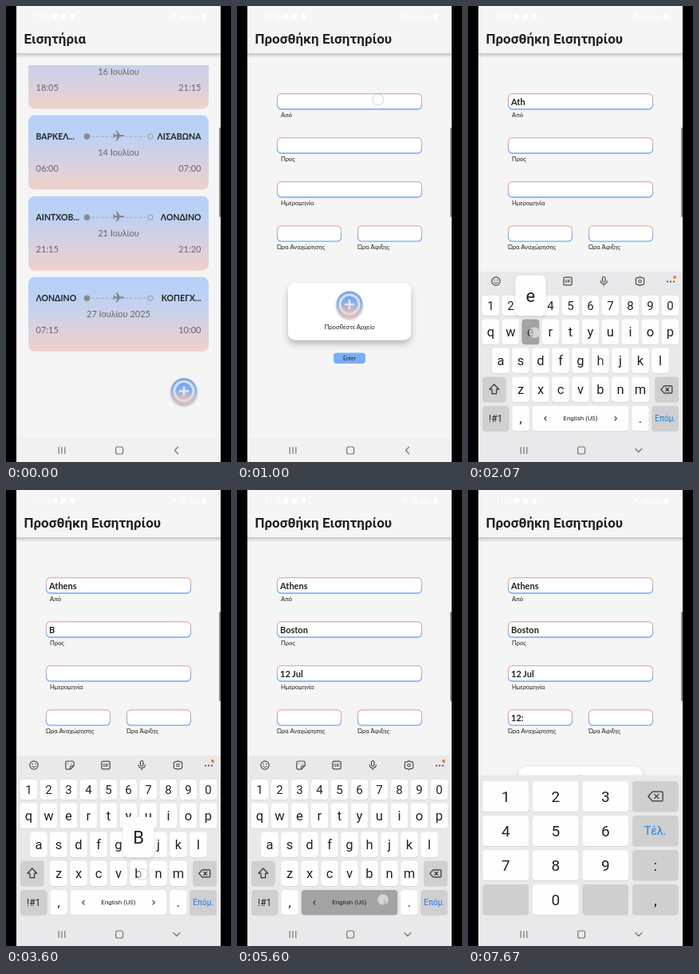
An HTML page for the animation above (8000 ms loop, 282 by 570 pixels).

```html
<!DOCTYPE html>
<html lang="el">
<head>
<meta charset="utf-8">
<style>
html, body { margin: 0; width: 100%; height: 100%; overflow: hidden; background: #000; }
svg { display: block; width: 282px; height: 570px; }
.lato { font-family: Lato, "Open Sans", sans-serif; }
.robo { font-family: Roboto, "Noto Sans", sans-serif; }
</style>
</head>
<body>
<svg id="stage" viewBox="0 0 282 570" xmlns="http://www.w3.org/2000/svg"></svg>
<script>
const LOOP = 8000;
const stage = document.getElementById('stage');
const $ = id => document.getElementById(id);

// ---- markup helpers ----
const rect = (x, y, w, h, r, fill, more = '') =>
  `<rect x="${x}" y="${y}" width="${w}" height="${h}" rx="${r}" fill="${fill}" ${more}/>`;
const circle = (x, y, r, fill, more = '') =>
  `<circle cx="${x}" cy="${y}" r="${r}" fill="${fill}" ${more}/>`;
const line = (d, color, w, more = '') =>
  `<path d="${d}" fill="none" stroke="${color}" stroke-width="${w}" stroke-linecap="round" stroke-linejoin="round" ${more}/>`;
const text = (s, x, y, size, { font = 'lato', fill = '#222', bold = 400, at = 'start', more = '' } = {}) =>
  `<text class="${font}" x="${x}" y="${y}" font-size="${size}" font-weight="${bold}" fill="${fill}" text-anchor="${at}" ${more}>${s}</text>`;
const group = (id, body, more = '') => `<g id="${id}" ${more}>${body}</g>`;
const grad = (id, stops) => `<linearGradient id="${id}" x1="0" y1="0" x2="0" y2="1">` +
  stops.map(([o, c, a = 1]) => `<stop offset="${o}" stop-color="${c}" stop-opacity="${a}"/>`).join('') + '</linearGradient>';
const shadow = (id, dy, blur, a) => `<filter id="${id}" x="-30%" y="-30%" width="160%" height="180%">` +
  `<feDropShadow dx="0" dy="${dy}" stdDeviation="${blur}" flood-color="#000" flood-opacity="${a}"/></filter>`;

const defs = '<defs>' +
  grad('ticket', [[0, '#b7d0f8'], [.25, '#bbd1f5'], [1, '#f0d0cc']]) +
  grad('edge', [[0, '#eba9a6'], [.3, '#dfb0b8'], [1, '#6fa6fb']]) +
  grad('round', [[0, '#6fa6f8'], [.5, '#8fb2ea'], [1, '#eeb9b3']]) +
  grad('under', [[0, '#000', .2], [1, '#000', 0]]) +
  shadow('soft', 5, 4, .25) + shadow('small', 2, 1.5, .3) + shadow('pop', 1, 1.5, .2) +
  '<clipPath id="screen"><rect x="13" y="0" width="256" height="570"/></clipPath>' +
  '<clipPath id="list"><rect x="13" y="74" width="256" height="466"/></clipPath></defs>';

// ---- app pages ----
const header = title =>
  rect(13, 59, 256, 6, 0, 'url(#under)') + rect(13, 0, 256, 59, 0, '#f5f5f5') +
  text(title, 22.5, 47, 17, { font: 'robo', bold: 600 });

const plusButton = (x, y) =>
  circle(x, y, 16.5, 'url(#round)', 'filter="url(#small)"') +
  circle(x, y, 12, 'none', 'stroke="#dcdfe4" stroke-width="3.2"') +
  circle(x, y, 10.4, 'url(#round)') +
  line(`M${x - 5} ${y}h10M${x} ${y - 5}v10`, '#e4e7ee', 2.6);

const plane = (x, y) =>
  `<path transform="translate(${x} ${y})" fill="#858585" d="M7 0C7 -.8 5.6 -1.1 4.6 -1.1H1.9L-1.7 -6.3H-3.2L-1.6 -1.1H-4.3L-5.6 -2.9H-6.8L-6 0L-6.8 2.9H-5.6L-4.3 1.1H-1.6L-3.2 6.3H-1.7L1.9 1.1H4.6C5.6 1.1 7 .8 7 0Z"/>`;

function ticket(y, [from, to, day, leave, land]) {
  const dim = { fill: '#666' }, city = { bold: 700 };
  return rect(28, y, 226, 93, 8, 'url(#ticket)') +
    text(from, 37.5, y + 30, 10.5, city) + text(to, 244.5, y + 30, 10.5, { ...city, at: 'end' }) +
    circle(101.5, y + 26.5, 3.8, '#8a8a8a') +
    line(`M107.5 ${y + 26.5}H134M149 ${y + 26.5}H175`, '#a3a8b0', 1, 'stroke-dasharray="3 3"') +
    plane(141, y + 25.5) +
    circle(181, y + 26.5, 3, 'none', 'stroke="#a3a5aa" stroke-width="1.3"') +
    text(day, 141, y + 50, 11, { ...dim, at: 'middle' }) +
    text(leave, 37.5, y + 70, 11, dim) + text(land, 244.5, y + 70, 11, { ...dim, at: 'end' });
}

const tickets = [
  ['', '', '16 Ιουλίου', '18:05', '21:15'],
  ['ΒΑΡΚΕΛ...', 'ΛΙΣΑΒΩΝΑ', '14 Ιουλίου', '06:00', '07:00'],
  ['ΑΙΝΤΧΟΒ...', 'ΛΟΝΔΙΝΟ', '21 Ιουλίου', '21:15', '21:20'],
  ['ΛΟΝΔΙΝΟ', 'ΚΟΠΕΓΧ...', '27 Ιουλίου 2025', '07:15', '10:00']
];
const listPage = header('Εισητήρια') +
  group('rows', tickets.map((d, i) => ticket(35.5 + i * 101.1, d)).join(''), 'clip-path="url(#list)"') +
  plusButton(223, 481.5);

const field = (i, x, y, w, label, lx) =>
  rect(x, y, w, 19.3, 5, '#fff', 'stroke="url(#edge)" stroke-width="1.3"') +
  text('', 54, y + 13.8, 11, { bold: 700, more: `id="val${i}"` }) +
  text(label, lx, y + 29.4, 7.6);

const formPage = rect(13, 0, 256, 540, 0, '#f5f5f5') + header('Προσθήκη Εισητηρίου') +
  field(0, 50.5, 109.7, 181, 'Από', 55) + field(1, 50.5, 164.7, 181, 'Προς', 55) +
  field(2, 50.5, 219.7, 181, 'Ημερομηνία', 55) +
  field(3, 50.5, 274.9, 80, 'Ώρα Αναχώρησης', 50) + field(4, 151.5, 274.9, 80, 'Ώρα Άφιξης', 151) +
  rect(64, 346, 154, 71.5, 9, '#fff', 'filter="url(#soft)"') + plusButton(141, 373) +
  text('Προσθέστε Αρχείο', 141, 403.5, 7.7, { at: 'middle' }) +
  rect(121, 433.5, 40, 13.5, 4, '#7aadf7') + text('Enter', 141, 443, 6.8, { at: 'middle' });

// ---- keyboards ----
const keys = {};
let letters = '';
const GREY = '#cfcfd0';

function key(id, x, y, w, h, label, size, fill = '#fefefe', color = '#222') {
  keys[id] = { x: x + w / 2, y: y + h / 2, fill };
  return rect(x, y + .8, w, h, 4, '#d3d3d5') + rect(x, y, w, h, 4, fill, `id="key-${id}"`) +
    text(label, x + w / 2, y + h / 2 + size * .36, size, { font: 'robo', fill: color, at: 'middle', more: `id="cap-${id}"` });
}

function row(chars, x, y, h, size) {
  return [...chars].map((c, i) => {
    if (c > '9') letters += c;
    return key(c, x + i * 25, y, 21.6, h, c, size);
  }).join('');
}

const ink = '#4a4a4c';
const backspace = (x, y, s) => line(`M${x - 7 * s} ${y}l${4 * s} ${-4.5 * s}h${9 * s}q${s} 0 ${s} ${s}v${7 * s}q0 ${s} ${-s} ${s}h${-9 * s}z` +
  `M${x - s} ${y - 2 * s}l${4 * s} ${4 * s}m0 ${-4 * s}l${-4 * s} ${4 * s}`, '#333', 1.2);

const toolbar =
  circle(35, 344, 5.2, 'none', `stroke="${ink}" stroke-width="1.2"`) +
  circle(33.2, 342.6, .8, ink) + circle(36.8, 342.6, .8, ink) + line('M32.4 345.4q2.6 2.6 5.2 0', ink, 1) +
  line('M76.5 339h7q1.7 0 1.7 1.7v4l-4.5 4.5h-4.2q-1.7 0-1.7-1.7v-6.8q0-1.7 1.7-1.7zM85 344.8h-2.6q-1.8 0-1.8 1.8v2.4M77.5 342.3h.1M82 342.3h.1', ink, 1.2) +
  rect(119.8, 339.2, 10.4, 9.6, 2, 'none', `stroke="${ink}" stroke-width="1.2"`) +
  text('GIF', 125, 345.8, 5, { font: 'robo', bold: 700, fill: ink, at: 'middle' }) +
  rect(168.4, 338.5, 3.6, 6.6, 1.8, 'none', `stroke="${ink}" stroke-width="1.2"`) +
  line('M166 343.5q.3 4 4.2 4q3.9 0 4.2-4M170.2 347.8v2', ink, 1.1) +
  line('M215.5 338.4l2 1.3 2.4.1 1 2.2-.4 2 .4 2-1 2.2-2.4.1-2 1.3-2-1.3-2.4-.1-1-2.2.4-2-.4-2 1-2.2 2.4-.1z', ink, 1.2) +
  circle(215.5, 344, 1.8, 'none', `stroke="${ink}" stroke-width="1.1"`) +
  [250, 254, 258].map(x => circle(x, 344.5, 1.1, ink)).join('') + circle(259, 339, 2, '#f07a2c');

const qwerty = rect(13, 332, 256, 238, 0, '#e9e9eb') + toolbar +
  row('1234567890', 17.6, 362, 25, 15) + row('qwertyuiop', 17.6, 391.5, 31.5, 16.5) +
  row('asdfghjkl', 30.2, 427.5, 31.5, 16.5) + row('zxcvbnm', 55.2, 463.5, 31.5, 16.5) +
  key('shift', 18, 463.5, 29.5, 31.5, '', 10, GREY) +
  line('M32.8 473l6 6.2h-3.2v5.5h-5.6v-5.5h-3.2z', '#333', 1.2, 'id="arrow"') +
  key('back', 234.2, 463.5, 29.8, 31.5, '', 10, GREY) + backspace(248.8, 479.3, 1) +
  key('sym', 18, 500, 33.4, 31.2, '!#1', 12, GREY) + key('comma', 55.4, 500, 21.4, 31.2, ',', 16) +
  key('space', 80.8, 500, 120.4, 31.2, 'English (US)', 8) +
  line('M98 513.3l-2.3 2.4 2.3 2.4M184 513.3l2.3 2.4-2.3 2.4', '#333', 1.1) +
  key('dot', 205.2, 500, 21.4, 31.2, '.', 16) + key('next', 230.4, 500, 33.6, 31.2, 'Επόμ.', 10, GREY, '#1f7fe0');

const padKey = (id, c, r, label, grey, size = 19, color) =>
  key(id, 18.5 + c * 62.5, 364 + r * 43, 57.5, 38, label, size, grey ? GREY : '#fefefe', color);
const numpad = rect(13, 356.5, 256, 214, 0, '#e9e9eb') +
  [1, 2, 3, 4, 5, 6, 7, 8, 9].map((n, i) => padKey('n' + n, i % 3, Math.floor(i / 3), n)).join('') +
  padKey('nb', 3, 0, '', true) + backspace(235, 383, 1.3) +
  padKey('nd', 3, 1, 'Τέλ.', true, 14, '#1f7fe0') + padKey('colon', 3, 2, ':', true) +
  padKey('e1', 0, 3, '', true) + padKey('n0', 1, 3, '0') + padKey('e2', 2, 3, '', true) + padKey('nc', 3, 3, ',', true);

const balloon = group('balloon', rect(-19.3, -70.5, 38.6, 50.5, 6, '#fdfdfd', 'filter="url(#pop)"') +
  text('', 0, -37.5, 22, { font: 'robo', at: 'middle', more: 'id="big"' }));

const nav = rect(13, 540, 256, 30, 0, '#f1f1f1', 'id="navbg"') +
  line('M66.2 551.5v8M70 551.5v8M73.8 551.5v8', '#777', 1.2) +
  rect(137.6, 551, 9, 9, 2.6, 'none', 'stroke="#777" stroke-width="1.2"') +
  line('', '#777', 1.3, 'id="chevron"');

const status = text('11:58', 35, 16.5, 8.5, { font: 'robo', fill: '#fff' }) +
  rect(58, 10, 6.5, 6.5, 1.5, '#fff') + rect(69, 10, 6, 6.5, 1, '#fff') + rect(81, 10, 5, 6.5, 1, '#fff') +
  line('M207 16l4-6M212 10v6M219 16v-3M222 16v-5M225 16v-6', '#fff', 1.2) +
  text('53%', 229, 16.5, 7, { font: 'robo', fill: '#fff' }) + rect(246, 9.5, 5, 7.5, 1, '#fff');

stage.innerHTML = defs + rect(0, 0, 282, 570, 0, '#000') +
  group('phone', rect(13, 0, 256, 570, 0, '#f5f5f5') + listPage + group('form', formPage) +
    group('board', group('qwerty', qwerty) + group('numpad', numpad) + balloon) +
    nav + status + rect(267, 152, 2, 112, 1, '#8a8a8a') +
    circle(0, 0, 7, '#fff', 'id="dotA" fill-opacity=".55" stroke="#9a9aa8" stroke-opacity=".5" stroke-width=".9"') +
    circle(0, 0, 7, '#fff', 'id="dotB" fill-opacity=".55" stroke="#9a9aa8" stroke-opacity=".5" stroke-width=".9"'),
    'clip-path="url(#screen)"');

// ---- script of touches: key, time, field, hold, touch point ----
const press = (id, at, to, hold = 65, x, y) => {
  const k = keys[id.toLowerCase()];
  return { id: id.toLowerCase(), at, to, hold, x: x ?? k.x + 5, y: y ?? k.y + 1 };
};
const word = (s, to, times) => [...s].map((c, i) => press(c, times[i], to));
const shift = at => press('shift', at, 0, 65, 32, 480.5);
const tap = (at, x, y, hold = 80) => ({ at, x, y, hold });

const touches = [
  tap(60, 223, 482, 120), tap(850, 177, 117, 160),
  shift(1500), ...word('Athens', 0, [1620, 1760, 1900, 2030, 2110, 2170]),
  tap(2500, 171.5, 172.5, 40), shift(3100),
  ...word('Boston', 1, [3530, 3660, 3750, 3830, 3900, 3960]),
  tap(4230, 158.5, 231.5, 30),
  ...word('12', 2, [4620, 4760]), press('space', 4930, 2), shift(5050),
  ...word('Jul', 2, [5160, 5250, 5340]), press('space', 5530, 2, 120, 183, 512),
  tap(6180, 92, 286), press('n1', 6600, 3), press('n2', 6850, 3, 65, 95, 392.5),
  press('colon', 7320, 3, 180, 235.5, 465.5)
];
const output = { space: ' ', colon: ':' };
const clamp = v => Math.max(0, Math.min(1, v));
const ease = v => 1 - (1 - clamp(v)) ** 3;
const show = (id, on) => $(id).setAttribute('visibility', on ? 'inherit' : 'hidden');

function typed(t) {
  const vals = ['', '', '', '', ''];
  let upper = false;
  for (const p of touches) {
    if (!p.id || t < p.at + p.hold) continue;
    if (p.id === 'shift') { upper = true; continue; }
    const c = output[p.id] ?? p.id.replace('n', p.id.length > 1 ? '' : 'n');
    vals[p.to] += upper ? c.toUpperCase() : c;
    if (c >= 'a') upper = false;
  }
  return { vals, upper };
}

function render(t) {
  const enter = ease((t - 420) / 310);
  $('form').setAttribute('opacity', enter);
  $('form').setAttribute('transform', `translate(0 ${40 * (1 - enter)})`);

  const rise = ease((t - 1040) / 160);
  const pad = t >= 6350;
  $('board').setAttribute('transform', `translate(0 ${240 * (1 - rise)})`);
  show('board', rise > 0);
  show('qwerty', rise > 0 && !pad);
  show('numpad', pad);
  $('navbg').setAttribute('fill', rise > 0 ? '#e9e9eb' : '#f1f1f1');
  $('chevron').setAttribute('d', rise > 0 ? 'M209.8 553.5l4 4 4-4' : 'M215.5 551.3l-4 4.2 4 4.2');

  const { vals, upper } = typed(t);
  vals.forEach((v, i) => { $('val' + i).textContent = v; });
  for (const c of letters) $('cap-' + c).textContent = upper ? c.toUpperCase() : c;
  $('arrow').setAttribute('fill', upper ? '#333' : 'none');

  const live = touches.filter(p => t >= p.at && t < p.at + p.hold + 155);
  for (const p of touches) {
    if (!p.id || p.id === 'shift' || p.id === 'colon') continue;
    const down = touches.some(q => q.id === p.id && t >= q.at && t < q.at + q.hold);
    $('key-' + p.id).setAttribute('fill', down ? '#a3a3a5' : keys[p.id].fill);
  }

  const pop = live.filter(p => p.id && p.id.length === 1 && t < p.at + 105).pop();
  show('balloon', !!pop);
  if (pop) {
    const k = keys[pop.id];
    const before = typed(pop.at).upper;
    $('balloon').setAttribute('transform', `translate(${Math.max(37.5, Math.min(244, k.x))} ${k.y})`);
    $('big').textContent = before ? pop.id.toUpperCase() : pop.id;
  }

  ['dotA', 'dotB'].forEach((id, i) => {
    const p = live[live.length - 1 - i];
    show(id, !!p);
    if (!p) return;
    $(id).setAttribute('cx', p.x);
    $(id).setAttribute('cy', p.y);
    $(id).setAttribute('opacity', 1 - .85 * clamp((t - p.at - p.hold) / 155));
  });
}

const start = performance.now();
function tick() {
  render((performance.now() - start) % LOOP);
  requestAnimationFrame(tick);
}
tick();
</script>
</body>
</html>
```
